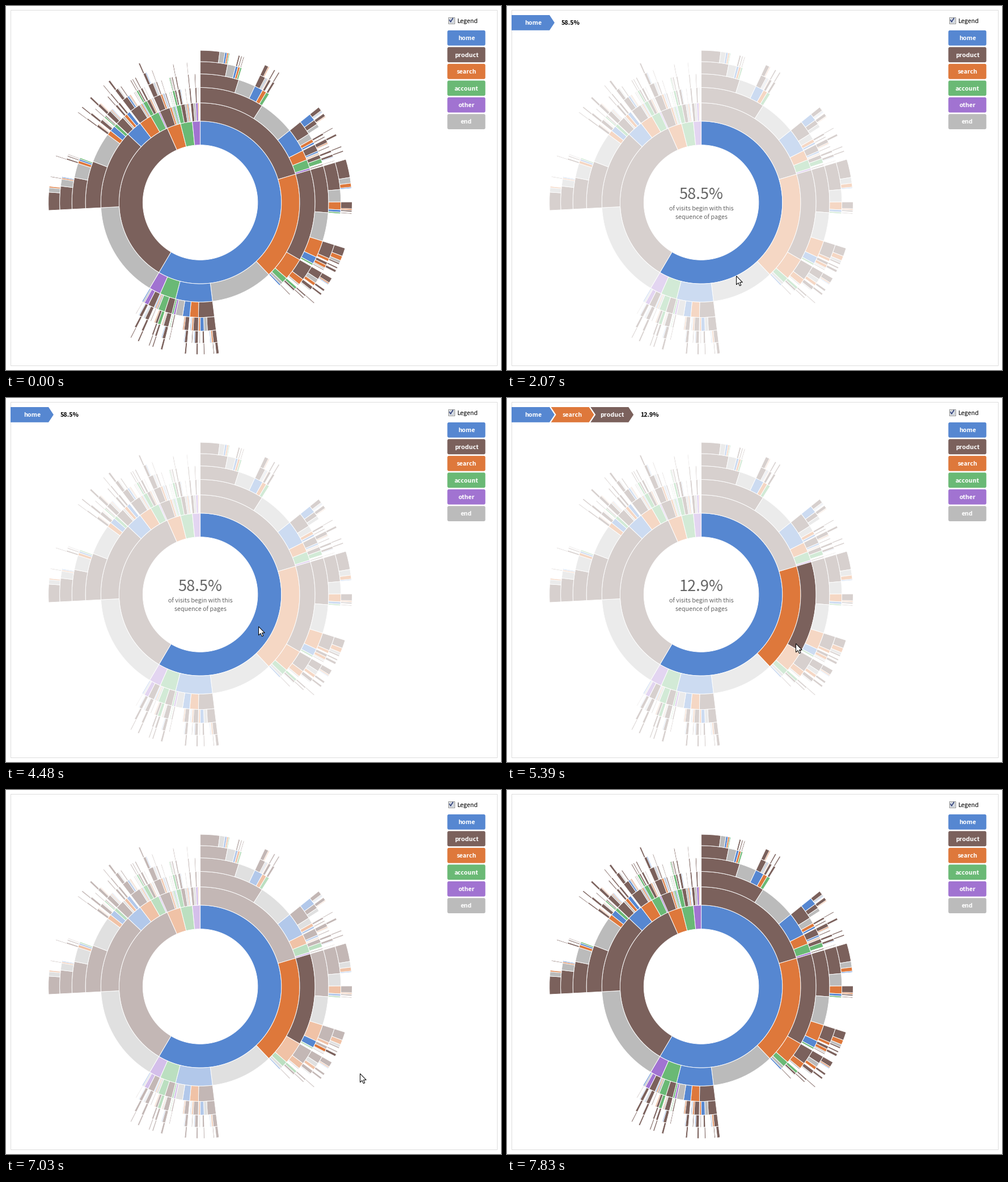
These frames come from a looping animation (873 px wide and 641 px high, 8270 ms). A matplotlib script:

```python
import math
import random

import numpy as np
import matplotlib.pyplot as plt
from matplotlib.animation import FuncAnimation
from matplotlib.collections import PolyCollection
from matplotlib.colors import to_rgb
from matplotlib.patches import FancyBboxPatch, Polygon, Rectangle

W, H = 873, 641
LOOP, TICK = 8270, 10
PT = 0.72                      # points per pixel at 100 dpi
ZOOM = 0.893                   # page zoom of the chart
CX, CY = 342.6, 346
R0 = 300 * ZOOM / math.sqrt(7)
MIN_SPAN = 0.29                # degrees; smaller arcs are dropped
FADED = 0.3

NAMES = {"h": "home", "p": "product", "s": "search",
         "a": "account", "o": "other", "e": "end"}
COLORS = {"h": "#5687d1", "p": "#7b615c", "s": "#de783b",
          "a": "#6ab975", "o": "#a173d1", "e": "#bbbbbb"}

# Visit path -> next pages and their spans in degrees.
TREE = {
    "": ("hpsao", 210.6, 125.4, 9.9, 8.5, 5.6),
    "h": ("psehao", 73.5, 62.9, 36.5, 21.5, 9.4, 6.8),
    "p": ("ephsao", 56.4, 46.3, 9.4, 7.4, 5.1, 0.8),
    "s": ("pseah", 6.1, 1.1, 0.9, 0.9, 0.6),
    "a": ("apesh", 2.8, 2.4, 1.2, 0.8, 0.5),
    "o": ("peos", 1.7, 1.3, 1.3, 0.5),
    "hp": ("pehsao", 32.6, 18.6, 12, 5, 4.4, 0.9),
    "hs": ("psaeh", 46.4, 11.3, 2.9, 1.4, 0.8),
    "hh": ("psheoa", 8, 4.4, 3.6, 3.6, 1, 0.9),
    "ha": ("paesh", 3.6, 3.5, 1, 0.6, 0.5),
    "ho": ("poeh", 3.2, 2.2, 0.7, 0.6),
    "pp": ("pesha", 23.9, 15.3, 2.4, 2.9, 1.6),
    "ph": ("pesh", 4.3, 1, 1.6, 1.8),
    "ps": ("pesh", 5.3, 0.8, 0.7, 0.5),
    "hpp": ("pehsa", 17.5, 7.7, 3.9, 1.9, 1.5),
    "hph": ("pesh", 6.6, 2.7, 1.5, 0.9),
    "hpa": ("pa", 1.8, 2),
    "hsp": ("pesha", 21.1, 12.9, 7.7, 3.2, 0.8),
    "hss": ("pse", 6.9, 2.8, 0.6),
    "hhp": ("pehs", 3.9, 1.5, 1.7, 0.7),
    "ppp": ("pesha", 14.2, 6.5, 1.3, 0.8, 0.6),
    "hppp": ("pehsa", 11.3, 3.3, 1, 0.9, 0.7),
    "hphp": ("hpe", 3, 2, 1.4),
    "hspp": ("pesha", 11.2, 5.1, 3.2, 1, 0.6),
    "hsps": ("ps", 6, 1.2),
    "hsph": ("pse", 1.2, 1.3, 0.5),
    "hssp": ("pes", 3.2, 1.8, 1.3),
    "pppp": ("pesh", 9.7, 2.9, 0.5, 0.4),
    "hpppp": ("pehsa", 7.4, 2, 0.8, 0.6, 0.4),
    "hsppp": ("pesh", 7, 2.2, 1.5, 0.4),
    "hspps": ("pse", 2.6, 0.5, 0.4),
    "hspsp": ("pse", 3.2, 1.8, 1.1),
    "hsphs": ("p", 0.954),
    "ppppp": ("pes", 6.9, 1.7, 0.5),
}

rng = random.Random(4)


def children(path, span):
    if path in TREE:
        pages, *spans = TREE[path]
        return list(zip(pages, spans))
    # Small branches: mostly product, and account pages lead on to account once.
    rest = "".join(rng.sample("she", 3))
    if path[-1] == "a" and len(path) < 4:
        pages, shares = "ap" + rest, [0.42, 0.32, 0.12, 0.08]
    else:
        pages, shares = "p" + rest, [rng.uniform(0.45, 0.65), 0.15, 0.1, 0.08]
    return [(page, share * span) for page, share in zip(pages, shares)]


def grow(path, start, span, arcs):
    if path:
        arcs.append((path, start, span))
    if len(path) == 6 or path.endswith("e"):
        return
    for page, width in children(path, span):
        if width >= MIN_SPAN:
            grow(path + page, start, width, arcs)
        start += width


def arc_points(depth, start, span):
    a = np.radians(np.linspace(start, start + span, int(span / 3) + 2))
    inner, outer = R0 * math.sqrt(depth), R0 * math.sqrt(depth + 1)
    r = np.r_[np.full(len(a), outer), np.full(len(a), inner)]
    a = np.r_[a, a[::-1]]
    return np.c_[CX + r * np.sin(a), CY - r * np.cos(a)]


arcs = []
grow("", 0, 360, arcs)
base = np.array([to_rgb(COLORS[path[-1]]) for path, _, _ in arcs])
spans = {path: span for path, _, span in arcs}


def hit(x, y):
    depth = int(((x - CX) ** 2 + (y - CY) ** 2) / R0 ** 2)
    angle = math.degrees(math.atan2(x - CX, CY - y)) % 360
    for path, start, span in arcs:
        if len(path) == depth and start <= angle < start + span:
            return path
    return None


# Screen updates: (first, last, count) in ms.
BURSTS = [(940, 1750, 8), (1850, 2570, 7), (2680, 3020, 4), (3600, 3600, 1),
          (3820, 4580, 8), (4700, 5390, 7), (5520, 5520, 1), (5640, 6430, 8),
          (6540, 6660, 2), (6790, 7030, 3), (7150, 7260, 2), (7380, 7830, 5)]
steps = np.concatenate([[0]] + [np.linspace(*b) for b in BURSTS])

# Pointer track: time, x, y.
TRACK = np.array([
    (940, 458, 619), (1750, 410, 498), (2570, 387, 413), (3020, 372, 362),
    (3600, 373, 362), (3710, 373, 362), (4580, 455, 408), (5390, 509, 432),
    (5520, 517, 440), (6430, 571, 461), (6660, 589, 470), (7030, 624, 499),
    (7260, 756, 596), (7380, 805, 622), (7490, 853, 636), (7600, 890, 665)])
HOVER, LEAVE, RESTORED = 1850, 6710, 7760


def pointer(t):
    return np.interp(t, TRACK[:, 0], TRACK[:, 1]), np.interp(t, TRACK[:, 0], TRACK[:, 2])


hovered, current = [], ""
for t in steps:
    if HOVER <= t < LEAVE:
        current = hit(*pointer(t)) or current
    hovered.append(current)


def dim_level(t):
    if t < HOVER:
        return 1.0
    u = min(max((t - LEAVE) / (RESTORED - LEAVE), 0), 1)
    return FADED + (1 - FADED) * u * u * (3 - 2 * u)


fig = plt.figure(figsize=(W / 100, H / 100), dpi=100, facecolor="white")
ax = fig.add_axes([0, 0, 1, 1])
ax.set_xlim(0, W)
ax.set_ylim(H, 0)
ax.axis("off")


def label(x, y, text, px=10.7, color="black", weight="normal", ha="center"):
    return ax.text(x, y, text, fontsize=px * PT, color=color, weight=weight, ha=ha,
                   va="baseline", family=["Noto Sans CJK JP", "DejaVu Sans"])


ax.add_patch(Rectangle((7.5, 6.5), 858, 626, fc="none", ec="#dddddd", lw=PT))

wheel = PolyCollection([arc_points(len(p), s, w) for p, s, w in arcs],
                       edgecolors="white", linewidths=0.9 * PT)
ax.add_collection(wheel, autolim=False)

# Legend
ax.add_patch(Rectangle((779.5, 19.5), 11, 11, fc="#f4f4f4", ec="#8e8f8f", lw=PT))
ax.add_patch(Rectangle((781.5, 21.5), 7, 7, fc="#dde3ea", ec="#b4bcc6", lw=PT))
ax.plot([782.3, 784.3, 788], [25, 27.8, 21.8], color="#31407a", lw=1.7 * PT)
label(796, 30.5, "Legend", ha="left")
for i, (key, name) in enumerate(NAMES.items()):
    top = 42.9 + 33 * ZOOM * i
    ax.add_patch(FancyBboxPatch((778.4, top), 75 * ZOOM, 30 * ZOOM, lw=0, fc=COLORS[key],
                                boxstyle="round,pad=0,rounding_size=2.7"))
    label(778.4 + 37.5 * ZOOM, top + 17.2, name, color="white", weight="bold")

# Breadcrumb trail
LEFT, TOP = 8, 16
CW, CH, TIP, PITCH = (ZOOM * v for v in (75, 30, 10, 78))
crumbs = []
for i in range(6):
    shape = [(0, 0), (CW, 0), (CW + TIP, CH / 2), (CW, CH), (0, CH)]
    if i:
        shape.append((TIP, CH / 2))
    left = LEFT + i * PITCH
    patch = ax.add_patch(Polygon([(left + x, TOP + y) for x, y in shape], lw=0))
    text = label(left + (CW + TIP) / 2, TOP + 17.2, "", color="white", weight="bold")
    crumbs.append((patch, text))
total = label(0, TOP + 17.2, "", weight="bold")

# Centre text
share = label(CX, 340.5, "", px=27.2, color="#666666")
notes = [label(CX, 360, "of visits begin with this", color="#666666"),
         label(CX, 375, "sequence of pages", color="#666666")]

ARROW = np.array([(0.5, 0.5), (0.5, 15.8), (4, 12.5), (6.4, 17.7),
                  (8.8, 16.7), (6.5, 11.6), (11.3, 11.6)])
cursor = ax.add_patch(Polygon(ARROW, fc="white", ec="black", lw=PT, zorder=9))


def draw(i):
    k = np.searchsorted(steps, i * TICK + 0.5) - 1
    t, path = steps[k], hovered[k]

    level = np.array([1.0 if path.startswith(p) else dim_level(t) for p, _, _ in arcs])
    wheel.set_facecolor(1 - (1 - base) * level[:, None])

    trail = path if HOVER <= t < LEAVE else ""
    for n, (patch, text) in enumerate(crumbs):
        shown = n < len(trail)
        patch.set_visible(shown)
        text.set_visible(shown)
        if shown:
            patch.set_facecolor(COLORS[trail[n]])
            text.set_text(NAMES[trail[n]])
    for text in (total, share, *notes):
        text.set_visible(bool(trail))
    if trail:
        percent = f"{spans[trail] / 3.6:#.3g}%"
        total.set_text(percent)
        total.set_x(LEFT + (len(trail) + 0.5) * PITCH)
        share.set_text(percent)

    cursor.set_visible(t >= TRACK[0, 0])
    cursor.set_xy(ARROW + np.round(pointer(t)))
    return []


anim = FuncAnimation(fig, draw, frames=LOOP // TICK, interval=TICK,
                     repeat=True, repeat_delay=0, cache_frame_data=False)
plt.show()
```
